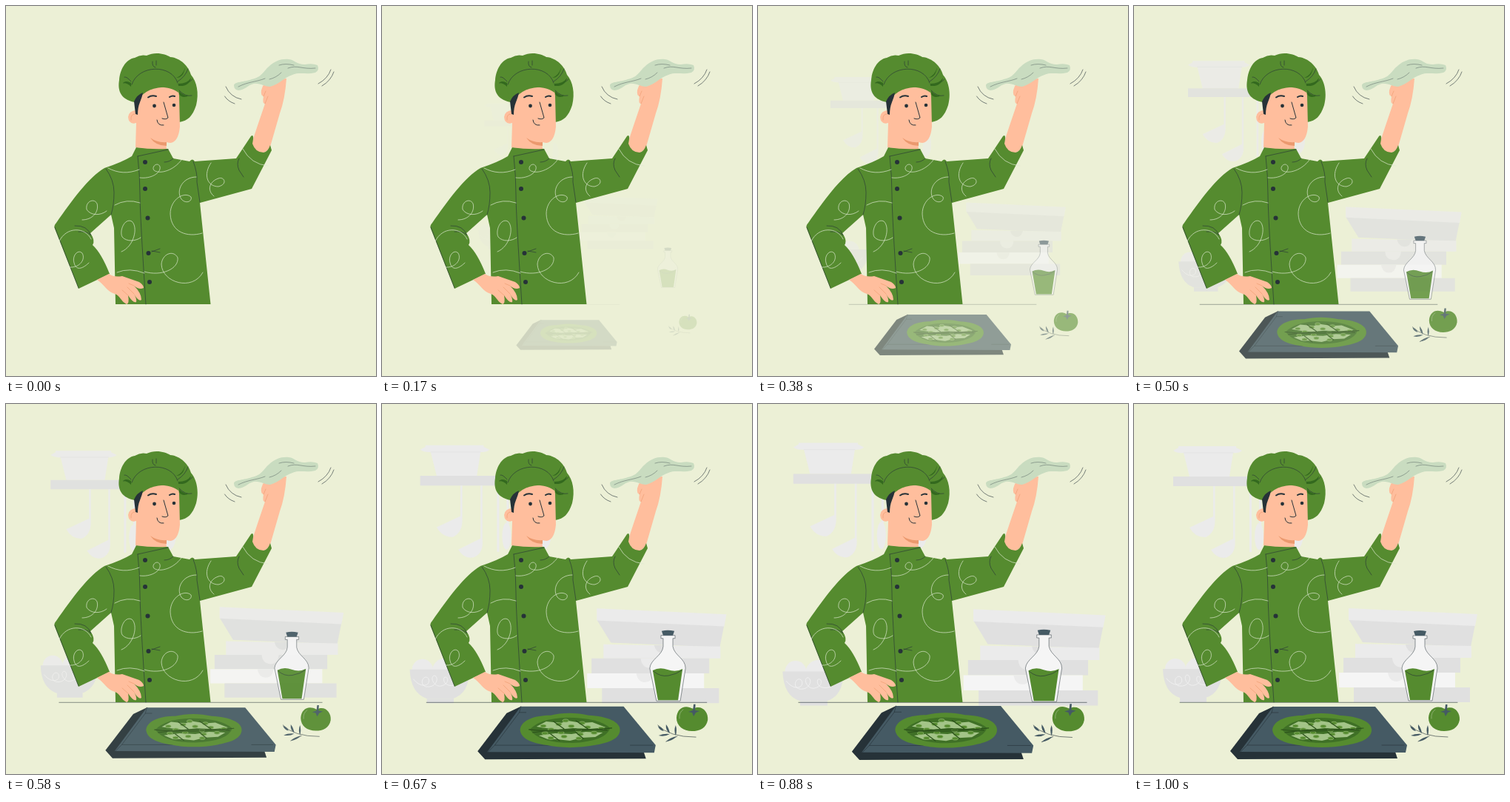
These frames come from a looping animation (500x500 px, 1040 ms). An HTML page:

```html
<!DOCTYPE html>
<html lang="en">
<head>
<meta charset="utf-8">
<title>Chef</title>
<style>
html, body { margin: 0; width: 100%; height: 100%; overflow: hidden; background: #ecf0d6; }
svg { display: block; width: 100vw; height: 100vh; }
.green { fill: #558b2f; }
.skin { fill: #ffbe9d; }
.ink { fill: #263238; }
.slate { fill: #455a64; }
.pale { fill: #f5f5f5; }
.light { fill: #ebebeb; }
.grey { fill: #e0e0e0; }
.line, .swirl { fill: none; stroke: #263238; stroke-width: .6; stroke-linecap: round; stroke-linejoin: round; }
.swirl { stroke: #dfead2; stroke-width: .7; }
</style>
</head>
<body>
<svg viewBox="0 0 500 500">
  <g class="pop" data-x="251.5" data-y="230">
    <!-- shelf, pot and hanging tools -->
    <path class="light" d="M60 57H138V59L146 63Q141 67 134 66L129 98H75L67 66Q59 67 53 63L60 59Z"/>
    <path class="line" style="stroke:#e0e0e0" d="M67 66H134"/>
    <path class="grey" d="M53 98H205V111H53Z"/>
    <g class="light">
      <path d="M107 111H109.500V156Q110 174 97 180Q83 181 75 167L107 152Z"/>
      <path d="M134 111H136.500V184Q138 201 126 207Q113 211 104 197L134 182Z"/>
      <path d="M156 111H159V200H156ZM169 111H172V165H169ZM216 150Q229 150 229 174Q229 191 221 196H213Z"/>
      <ellipse cx="169" cy="179" rx="6" ry="18"/>
    </g>
    <!-- bowl -->
    <circle class="light" cx="56" cy="358" r="14"/>
    <circle class="light" cx="86" cy="360" r="17"/>
    <path class="grey" d="M39 358H119Q119 390 97 397H62Q40 390 39 358Z"/>
    <path class="grey" d="M62 397H98V403H62Z"/>
    <path class="swirl" style="stroke:#f5f5f5" d="M44 371C54 384 68 380 64 370C58 363 50 378 61 381C75 383 79 368 72 366C65 368 72 382 81 380C94 377 90 365 85 369C82 382 103 383 109 372"/>
    <!-- stacked boxes -->
    <path class="grey" d="M290 291L461 298L455 328L309 322Z"/>
    <path class="light" d="M290 276L464 284L461 300L290 292Z"/>
    <path class="light" d="M299 324L456 327V343H299Z"/>
    <path class="grey" d="M283 343H441V363H283Z"/>
    <path class="pale" d="M277 363H434V383H277Z"/>
    <path class="grey" d="M297 383H454V403H297Z"/>
    <path class="grey" d="M367 325H389Q387 336 378 336Q369 335 367 325Z"/>
    <path class="light" d="M349 343H373Q372 356 361 356Q350 355 349 343Z"/>
    <path class="light" d="M343 363H366Q364 375 355 375Q345 375 343 363Z"/>
  </g>

  <g class="pop" data-x="249.5" data-y="403.3" data-from=".28">
    <path class="line" d="M62 403.300H437"/>
  </g>

  <g id="chef">
    <!-- raised forearm and cloth -->
    <path class="skin" d="M331 190C337 169 344 150 350 132Q346 132 348 122Q344 121 345 114Q347 104 357 100L379 98Q377 126 370 145L357 190Q351 201 341 198Z"/>
    <path class="line" style="stroke:#eb996e" d="M348 122L351 115M350 132L354 122"/>
    <path fill="#c9dcc0" d="M308 107C309 102 322 103 332 99C346 96 347 89 355 82C363 74 373 71 382 72C391 73 392 79 404 79Q414 77 421 80Q424 87 418 90C407 93 396 89 387 93C375 97 369 106 357 109C348 109 344 104 335 105C326 107 324 113 314 114Q308 113 308 107Z"/>
    <path class="line" stroke-opacity=".6" d="M314 109C328 102 337 103 350 98M356 99Q365 97 372 90M369 80Q378 77 389 80M381 84C394 79 400 86 418 84"/>
    <path class="line" d="M297 109Q303 123 318 126M295.500 122Q300 129 309 132M439 86Q435 98 422 105M443 89Q439 101 427 108"/>

    <!-- jacket -->
    <path class="green" d="M176 191L219 193L226 206L248 210Q252 205 255 210L311 206L331 176Q336 172 333 186Q337 198 348 198Q354 197 357 188L359 195L332 247L262 266L276.500 403H148L146 300L142 282L114 307Q121 317 117 323Q129 334 140 362L98 382L66 301Q64 297 68 293C89 263 112 231 133 219Q157 211 170 203Z"/>
    <path class="line" d="M178 203L219 194M178 203Q181 229 181 255T189 403M214 211Q221 211 226 206M253 210Q259 226 258 238L262 265M135 220Q146 235 146 252T142 282M315 206Q311 213 315 222L321 231M93 297Q110 296 115 310M98 305Q109 304 114 309M66 299L98 381M197 332L208 328M197 331L208 333"/>
    <g class="swirl">
      <path d="M138 219C151 226 165 227 180 221M181 232C195 234 210 226 208 217C205 210 196 217 200 222C208 228 227 222 237 208"/>
      <path d="M103 289C117 289 126 278 123 267C119 259 107 264 109 275C114 283 127 284 136 277M147 269Q163 260 181 266"/>
      <path d="M72 318C81 298 107 298 115 315M86 353C99 354 108 343 103 334C97 328 89 338 92 347C95 360 106 353 112 347"/>
      <path d="M156 332C173 325 179 299 170 291C160 286 153 304 157 312C163 319 175 318 182 313M150 360Q167 353 187 361"/>
      <path d="M257 231C239 231 229 249 237 261C243 268 252 264 250 258C241 250 222 261 222 281C223 306 245 313 265 307"/>
      <path d="M187 359C210 366 234 355 232 340C226 329 211 335 210 349C211 374 252 386 266 360"/>
      <path d="M277 212C266 228 272 244 287 244C300 241 295 230 287 233C275 237 271 249 281 257M320 193Q331 214 354 216"/>
    </g>
    <g class="ink">
      <circle cx="188" cy="211" r="3"/><circle cx="188" cy="247" r="3"/>
      <circle cx="191.500" cy="286.500" r="3"/><circle cx="192.500" cy="334" r="3"/>
      <circle cx="194" cy="373" r="3"/>
    </g>

    <!-- hand on hip -->
    <path class="skin" d="M123 370L139 362Q146 367 157 365L180 373Q186 377 186 381Q180 384 173 378Q183 388 183 397Q179 400 173 389Q177 396 176 400Q172 402 165 391Q167 402 163 403C155 399 154 391 147 389C136 386 132 375 123 370Z"/>
    <path class="line" style="stroke:#eb996e" d="M173 378L166 375M173 389L164 380M165 391L157 384"/>

    <!-- hat and head -->
    <path class="green" d="M174 130C153 126 151 112 153 100C154 87 161 72 174 70Q182 65 190 67C202 61 216 65 222 69C236 70 247 82 250 93C258 102 261 118 257 134C252 149 246 155 234 157L229 115Z"/>
    <path class="skin" d="M177 141L180 126Q191 107 229 110Q233 112 234 121L235 163Q233 184 222 185L216 184L217 193Q196 194 175 191L176 158Q166 161 165 150Q166 141 177 141Z"/>
    <path fill="#eb996e" d="M195 178Q204 185 217 184L217 189Q202 189 195 178Z"/>
    <path class="ink" d="M173 129Q177 120 185 117Q184 123 181 130Q178 137 178 147L175 146Z"/>
    <path class="green" d="M173 127Q167 113 171 102C181 79 222 80 232 102L233 117C217 105 184 108 173 127Z"/>
    <path class="line" d="M170 106C179 79 224 78 232 104M198 75Q197 82 202 83M203 74V80M169 106Q164 101 159 104M169 102Q163 95 160 96M232 102Q242 96 246 85M233 106Q246 106 252 99M234 114Q242 123 251 121"/>
    <path fill="#33691e" d="M230 97Q239 94 242 83Q240 97 230 97ZM233 105Q245 105 250 97Q248 109 233 108ZM234 115Q240 122 248 121Q238 126 234 119ZM169 104Q162 100 158 104Q164 104 169 109Z"/>
    <path class="line" style="stroke-width:2" d="M192 123.500Q197 120 203 122M221 123Q225 120.500 228 122"/>
    <circle class="ink" cx="200.500" cy="135" r="2.400"/>
    <circle class="ink" cx="227" cy="134" r="2.300"/>
    <path class="line" style="stroke-width:1" d="M213 130L219 151Q216 154 211 152M204 154Q205 162 213 161"/>
    <path class="line" style="stroke:#eb996e" d="M174 146Q168 146 169 154"/>
  </g>

  <g class="pop" data-x="249.5" data-y="444.5">
    <path class="ink" d="M130 469L169 418L188 409L353 470L356 479L140 480Z"/>
    <path class="slate" d="M188 409H326L369 461L367 471L143 470Z"/>
    <path class="line" d="M188 409L186 417L153 461H241M335 461H365M186 417H195M153 461L144 470"/>
    <path class="green" d="M187 440C189 427 207 421 228 421C243 417 263 417 279 421C304 422 323 430 321 442C319 454 303 458 287 461C267 465 240 465 223 461C202 458 188 452 187 440Z"/>
    <path fill="#3f7026" d="M200 440Q214 425 250 424Q292 424 308 438Q302 456 256 458Q213 458 200 440Z"/>
    <g fill="#a3c488">
      <path d="M209 436L222 429L242 431L251 428L270 431L284 430L302 437L281 439L258 438L238 440L222 438Z"/>
      <path d="M212 448L234 445L256 446L275 443L298 444L288 450L270 451L254 455L236 453L224 453Z"/>
    </g>
    <g id="slices" fill="#558b2f" stroke="#8db46c" stroke-width=".8"></g>
    <path class="line" style="stroke:#2b511a;stroke-width:1.200" d="M199 440Q245 445 310 438M204 444Q250 437 304 441M232 429L246 439M262 428L278 439M228 446L240 455M262 444L272 452"/>
  </g>

  <g class="pop" data-x="386" data-y="353.500">
    <path class="pale" stroke="#263238" stroke-width=".5" d="M377 313H396V317H393V328C395 340 410 344 410 357L403 401H371L362 357C363 345 379 340 380 328V317H377Z"/>
    <path class="green" d="M366 360Q375 355 386 359T406 358L400 400H373Z"/>
    <path class="line" d="M367 361Q376 369 387 367T405 360"/>
    <path class="slate" d="M378 307Q386 305 395 307L393 313H380Z"/>
  </g>

  <g class="pop" data-x="406" data-y="431">
    <path class="green" d="M420 412C432 406 441 416 440 427C438 438 429 442 419 442C407 442 398 435 398 424C399 411 409 406 420 412Z"/>
    <path class="swirl" stroke-opacity=".5" d="M402 425Q401 417 407 413"/>
    <path class="slate" d="M421 406H423.500L423 414L429 415L424 417L421 422L419 417L414 416L420 414Z"/>
    <path class="line" d="M373 434Q388 450 424 450M399 449L384 456"/>
    <path class="slate" d="M389 445Q383 441 384 433Q388 438 389 445ZM397 448Q394 441 397 434Q399 441 397 448ZM381 442Q375 441 373 435Q379 437 381 442ZM389 446Q382 450 374 448Q381 445 389 446ZM398 449Q393 455 384 456Q389 451 398 449Z"/>
  </g>
</svg>
<script>
const slices = document.getElementById('slices');
for (let i = 0; i < 16; i++) {
  const a = i * 2.4, r = Math.sqrt((i + 1) / 16);
  slices.innerHTML += `<ellipse cx="${254 + 46 * r * Math.cos(a)}" cy="${441 + 13 * r * Math.sin(a)}" rx="4" ry="2"/>`;
}

const bezier = (a, b, u) => 3 * (1 - u) ** 2 * u * a + 3 * (1 - u) * u * u * b + u ** 3;

// Ease with overshoot: cubic-bezier(.36, -.01, .5, 1.38)
function ease(t) {
  let lo = 0, hi = 1;
  for (let i = 0; i < 30; i++) {
    const mid = (lo + hi) / 2;
    if (bezier(.36, .5, mid) < t) lo = mid; else hi = mid;
  }
  return bezier(-.01, 1.38, lo);
}

const parts = [...document.querySelectorAll('.pop')];

function draw(ms) {
  // Hold each pose for one step at 24 per second
  const step = Math.floor((ms % 1040 + 5) * .024);
  const p = step ? ease(Math.min(1, step / 24 + .03)) : 0;
  for (const part of parts) {
    const { x, y, from = .5 } = part.dataset;
    const s = 1 - (1 - from) * (1 - p);
    part.setAttribute('transform', `translate(${x} ${y}) scale(${s}) translate(${-x} ${-y})`);
    part.setAttribute('opacity', Math.max(0, Math.min(1, p)));
  }
}

const start = performance.now();
function tick() {
  draw(performance.now() - start);
  requestAnimationFrame(tick);
}
tick();
</script>
</body>
</html>
```
